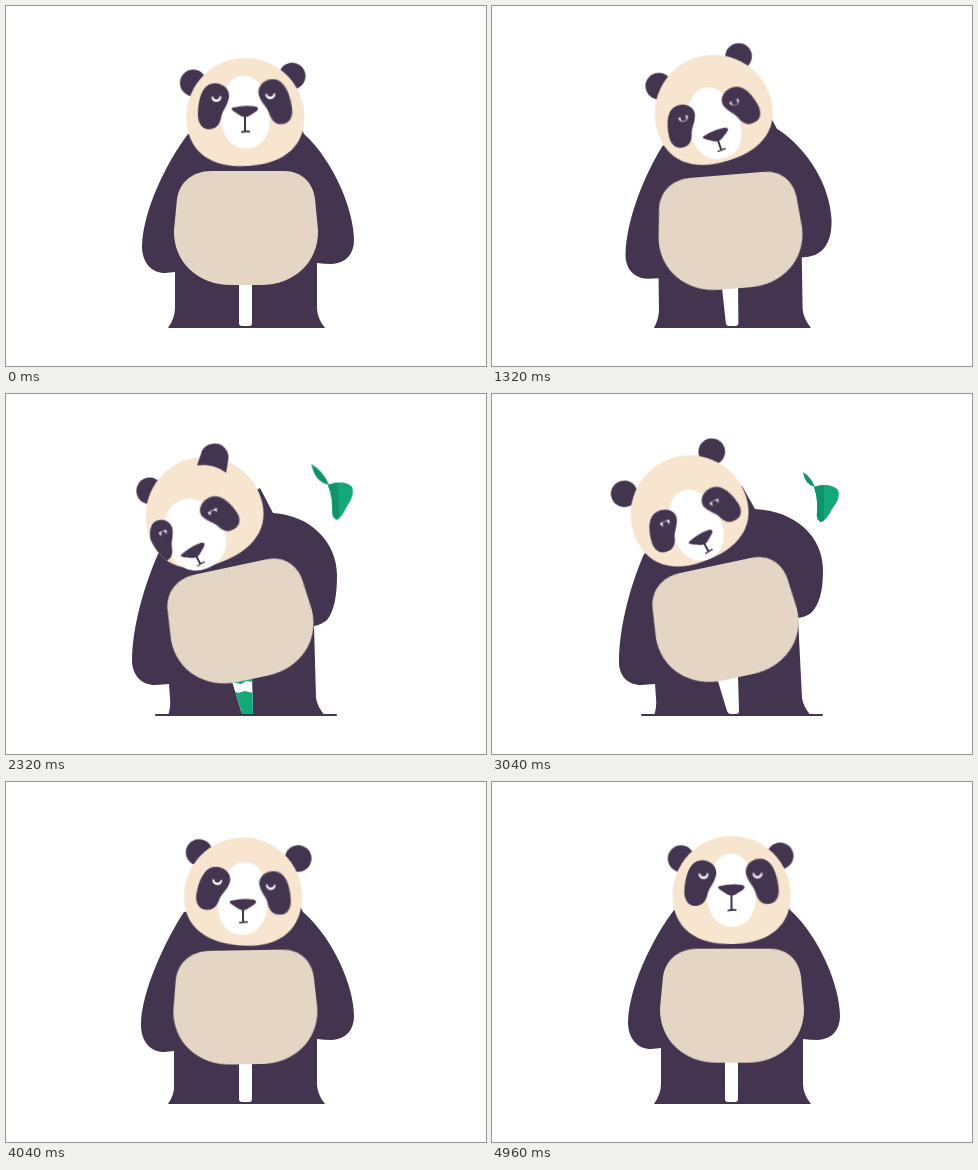
Recreate the animation shown at these times as an HTML page. Size 480x360 px, loop 5000 ms.

```html
<!DOCTYPE html>
<html lang="en">
<head>
<meta charset="utf-8">
<title>Panda</title>
<style>
/* hx, hy, tilt: head placement; x, y: where the face looks; lx, rx: ear shifts; n: nose angle */
@property --hx { syntax: "<number>"; inherits: true; initial-value: 239 }
@property --hy { syntax: "<number>"; inherits: true; initial-value: 106 }
@property --tilt { syntax: "<number>"; inherits: true; initial-value: -4 }
@property --x { syntax: "<number>"; inherits: true; initial-value: 0 }
@property --y { syntax: "<number>"; inherits: true; initial-value: 0 }
@property --lx { syntax: "<number>"; inherits: true; initial-value: 0 }
@property --rx { syntax: "<number>"; inherits: true; initial-value: 0 }
@property --n { syntax: "<number>"; inherits: true; initial-value: 4 }

html, body { margin: 0; width: 100%; height: 100%; overflow: hidden; background: #fff }
svg { display: block; width: 100vw; height: 100vh }
.dark { fill: #43344f }
.cream { fill: #f7e5d0 }
.white { fill: #fff }
.line { fill: none; stroke: #43344f; stroke-width: 2; stroke-linecap: round }

.head, .body, .gap, .belly, .eye, .leaf, .stem, .shoot {
  animation: 5s ease-in-out infinite;
}
.head {
  animation-name: head;
  transform: translate(calc(var(--hx) * 1px), calc(var(--hy) * 1px)) rotate(calc(var(--tilt) * 1deg));
}
.face {
  transform: translate(calc(var(--x) * 1px), calc(var(--y) * 1px))
    scaleX(calc(1 + .012 * max(var(--x), 0 - var(--x))));
}
.patch-l {
  transform: translate(calc(var(--x) * 1px - 31.5px), calc(var(--y) * 1.1px - 8px))
    scale(calc(1 - .011 * max(0, 0 - var(--x))), calc(1 - .006 * var(--y)));
}
.patch-r {
  transform: translate(calc(var(--x) * 1px + 31.5px), calc(var(--y) * .96px - 8px))
    rotate(calc(var(--y) * -.4deg))
    scale(calc(1 - .011 * max(0, var(--x))), calc(1 - .007 * var(--y)));
}
.pupil { transform: translate(0px, calc(max(0, var(--y) - 8) * .35px)) }
.nose {
  transform: translate(calc(var(--x) * 1.4px), calc(var(--y) * 1.95px - .5px)) rotate(calc(var(--n) * 1deg));
}
.mouth { transform: scaleY(calc(1 - .018 * var(--y))) }
.ear-l { transform: translate(calc(var(--lx) * 1px - 49.6px), calc(var(--y) * -.35px - 32.6px)) rotate(-42deg) }
.ear-r { transform: translate(calc(var(--rx) * 1px + 49.6px), calc(var(--y) * -.72px - 32.6px)) rotate(36deg) }
.front-l { animation: front-l 5s step-end infinite }
.front-r { animation: front-r 5s step-end infinite }
.body { animation-name: body }
.gap { animation-name: gap }
.belly { animation-name: belly }
.eye { animation-name: blink }
.leaf { animation-name: leaf; transform-origin: 322px 95px }
.stem { animation-name: stem; transform-origin: 322px 93px }
.shoot { animation-name: shoot }
.leaflet { animation: leaflet 5s linear infinite }
.ground-l { animation: ground-l 5s step-end infinite }
.ground-r { animation: ground-r 5s step-end infinite }

@keyframes head {
  0%, 3% { --hx: 239; --hy: 106; --tilt: -4; --x: 0; --y: 0; --lx: 0; --rx: 0; --n: 4 }
  12% { --hx: 239; --hy: 103.5; --tilt: -10; --x: 17; --y: 16; --lx: 13; --rx: -12; --n: 4 }
  17.6%, 20% { --hx: 239.5; --hy: 104.5; --tilt: -11; --x: 18.5; --y: 17.8; --lx: 14.5; --rx: -13; --n: 4 }
  27% { --hx: 220; --hy: 103; --tilt: -17; --x: -3; --y: 14; --lx: 5; --rx: -9; --n: -2 }
  34.4% { --hx: 203.5; --hy: 116; --tilt: -22; --x: -15.5; --y: 18.2; --lx: 4; --rx: -14; --n: -6 }
  46.4%, 50% { --hx: 196.8; --hy: 117.3; --tilt: -22; --x: -16.7; --y: 18; --lx: 8; --rx: -18.6; --n: -6 }
  60.8%, 66% { --hx: 195.8; --hy: 115.7; --tilt: -22; --x: 1.5; --y: 17; --lx: -3.4; --rx: -5.6; --n: -6 }
  76% { --hx: 236; --hy: 110; --tilt: 4; --x: 2; --y: 9; --lx: 1; --rx: 1; --n: -4 }
  80.8% { --hx: 237.5; --hy: 109.5; --tilt: 5; --x: .5; --y: 7; --lx: 2; --rx: 2; --n: -5 }
  99.2% { --hx: 239.5; --hy: 108; --tilt: -1.5; --x: 0; --y: .3; --lx: 0; --rx: 0; --n: 1.5 }
  100% { --hx: 239; --hy: 106; --tilt: -4; --x: 0; --y: 0; --lx: 0; --rx: 0; --n: 4 }
}
@keyframes front-l { 0%, 25% { visibility: hidden } 8% { visibility: visible } }
@keyframes front-r { 0%, 54% { visibility: hidden } 30% { visibility: visible } }
@keyframes blink {
  0%, 42% { transform: none }
  44.5%, 49% { transform: scaleY(0) }
  52%, 70% { transform: none }
  80.8% { transform: scaleY(.6) }
  99.2%, 100% { transform: scaleY(.9) }
}
@keyframes body {
  0%, 3%, 99.2%, 100% { d: path("M182 128C160 157 137 205 136 240C136 257 146 267 159 267L169 266L169 302Q169 312 162 322L319 322Q311 312 311 302L311 257Q318 258 326 258C340 257 348 248 348 234C348 205 328 155 298 128L290 110Z") }
  17.6%, 20% { d: path("M180 126C160 155 139 200 138 236C138 251 148 260 160 260L169 260L169 302Q169 312 162 322L319 322Q311 312 311 302L311 267Q318 267 325 267C338 265 345 254 344 238C342 205 325 160 298 126L290 110Z") }
  34.4% { d: path("M157 160C140 192 127 236 127 268C127 282 136 291 149 291L163 290L164 304Q165 312 162 322L319 322Q311 312 310 304L308 229Q314 228 320 223C329 214 333 200 333 178C332 145 306 120 266 118L252 94Z") }
  46.4%, 50% { d: path("M152 160C139 190 126 232 126 268C127 282 136 291 149 291L163 290L164 304Q165 312 162 322L319 322Q311 312 310 304L308 232Q315 231 321 226C328 217 331 203 331 181C331 148 304 121 267 119L254 94Z") }
  60.8%, 66% { d: path("M152 160C139 190 127 232 127 268C127 282 136 291 149 291L163 290L164 304Q165 312 162 322L319 322Q311 312 310 304L306 224Q314 223 319 219C327 211 331 198 331 176C331 142 303 117 263 115L250 92Z") }
  78%, 81% { d: path("M178 130C160 157 135 210 135 243C135 260 145 270 158 270L168 269L168 302Q169 312 162 322L319 322Q311 312 311 302L311 257Q318 258 326 258C340 257 348 248 348 234C348 205 328 157 297 130L288 112Z") }
}
@keyframes gap {
  0%, 20%, 78%, 100% { d: path("M233 276L246 276L246 317Q246 320 243 320L236 320Q233 320 233 317Z") }
  34.4%, 66% { d: path("M225 284L246 281L247 317Q247 320 244 320L239 320Q236 320 235 317Z") }
}
@keyframes belly {
  0%, 3% { transform: translate(240px, 222px) }
  17.6%, 20% { transform: translate(240px, 223.5px) }
  34.4% { transform: translate(235.5px, 229px) rotate(-11.5deg) }
  46.4%, 50% { transform: translate(235px, 229px) rotate(-12deg) }
  60.8%, 66% { transform: translate(234px, 227.5px) rotate(-12deg) }
  78%, 80.8% { transform: translate(239.3px, 225.3px) rotate(-1deg) }
  99.2% { transform: translate(240px, 223.7px) }
  100% { transform: translate(240px, 222px) }
}
@keyframes leaf {
  0%, 29% { transform: translate(-50px, 60px) scale(.4); visibility: hidden }
  29.1% { transform: translate(-50px, 60px) scale(.4); visibility: visible }
  34.4% { transform: translate(1px, 0) rotate(-3deg) }
  46.4% { transform: translate(0, -2px) rotate(-3deg) }
  60.8%, 66% { transform: none; visibility: visible }
  70% { transform: translate(-50px, 60px) scale(.4); visibility: visible }
  70.1%, 100% { transform: translate(-50px, 60px) scale(.4); visibility: hidden }
}
@keyframes stem {
  0%, 36% { transform: none }
  46.4% { transform: scale(1.4, 1.45) }
  60.8%, 100% { transform: none }
}
@keyframes leaflet {
  0%, 32% { transform: translate(-5px, -9px); visibility: hidden }
  32.1% { transform: translate(-5px, -9px); visibility: visible }
  34.4% { transform: none; visibility: visible }
  36%, 100% { transform: translate(2px, 6px); visibility: hidden }
}
@keyframes shoot {
  0%, 32% { transform: translateY(45px) }
  34.4% { transform: translateY(26px) }
  44%, 49% { transform: none }
  57%, 100% { transform: translateY(45px) }
}
@keyframes ground-l { 0%, 67.6% { visibility: hidden } 40% { visibility: visible } }
@keyframes ground-r { 0%, 67.6% { visibility: hidden } 34% { visibility: visible } }
</style>
</head>
<body>
<svg viewBox="0 0 480 360">
  <defs>
    <path id="skull" d="M0-54C33-54 59-27 59 5C59 36 38 54 0 54C-38 54-59 36-59 5C-59-27-33-54 0-54Z"/>
    <path id="dome" d="M-15 12L-14 0A14 14 0 0 1 14 0L15 12Q0 6-15 12Z"/>
    <path id="patch" transform="rotate(4)" d="M2-23C11-23 17-16 16-9C14 1 9 4 8 12C6 20 2 23-4 23C-12 23-16 15-15 5C-14-10-10-23 2-23Z"/>
    <g id="eye" class="eye">
      <path class="white" d="M-5-1.5A5 5.5 0 0 0 5-1.5Z"/>
      <circle class="dark pupil" cy="-1.5" r="3"/>
    </g>
    <clipPath id="in-skull"><use href="#skull"/></clipPath>
    <clipPath id="in-gap"><path d="M225 284L246 281L247 320L236 320Z"/></clipPath>
  </defs>

  <g class="leaf">
    <path class="stem" fill="#0e9468" d="M311 78Q319 83 323 93Q313 91 311 78Z"/>
    <path fill="#12a878" d="M322 93Q338 88 346 96Q349 104 340 115Q334 127 329 128Q324 126 325 118Q326 104 322 93Z"/>
    <path fill="#0e9468" d="M322 93Q328 91 332 91L332 126Q330 128 329 128Q324 126 325 118Q326 104 322 93Z"/>
  </g>
  <path class="leaflet" fill="#12a878" d="M345 132Q350 125 358 127Q354 133 345 132Z"/>

  <path class="line ground-l" d="M150 321H165"/>
  <path class="line ground-r" d="M312 321H330"/>
  <path class="dark body" d="M182 128C160 157 137 205 136 240C136 257 146 267 159 267L169 266L169 302Q169 312 162 322L319 322Q311 312 311 302L311 257Q318 258 326 258C340 257 348 248 348 234C348 205 328 155 298 128L290 110Z"/>
  <path class="white gap" d="M233 276L246 276L246 317Q246 320 243 320L236 320Q233 320 233 317Z"/>
  <g clip-path="url(#in-gap)">
    <path class="shoot" fill="#12a878" d="M226 280H248V288L240 287L235 290L226 288ZM226 296L232 299L239 297L247 299V322H226Z"/>
  </g>
  <path class="belly" fill="#e5d5c5" d="M-35-57H38C56-57 67-45 69-29L72 2C73 34 48 57 15 57H-15C-48 57-73 34-72 2L-69-29C-67-45-54-57-35-57Z"/>

  <g class="head">
    <circle class="dark ear-l" r="13.3"/>
    <circle class="dark ear-r" r="13.3"/>
    <use class="cream" href="#skull"/>
    <g class="front-l"><use class="dark ear-l" href="#dome"/></g>
    <g class="front-r"><use class="dark ear-r" href="#dome"/></g>
    <path class="white face" d="M0-36.5C15-36.5 24.500-18 24.500 5C24.500 25 14 36.500 0 36.500C-14 36.500-24.500 25-24.500 5C-24.500-18-15-36.500 0-36.500Z"/>
    <g clip-path="url(#in-skull)">
      <g class="patch-l">
        <use class="dark" href="#patch"/>
        <use href="#eye" transform="translate(4 -8)"/>
      </g>
      <g class="patch-r">
        <use class="dark" href="#patch" transform="scale(-1 1)"/>
        <use href="#eye" transform="translate(-5 -7)"/>
      </g>
    </g>
    <g class="nose">
      <path class="dark" d="M-12-4Q0-7 11-5Q15-3 11 0L4 4.500Q0 6.500-4 4.500L-11 0Q-15-3-12-4Z"/>
      <path class="line mouth" d="M0 4V19.500M-3 20.500Q1 19.500 4 20"/>
    </g>
  </g>
</svg>
</body>
</html>
```
